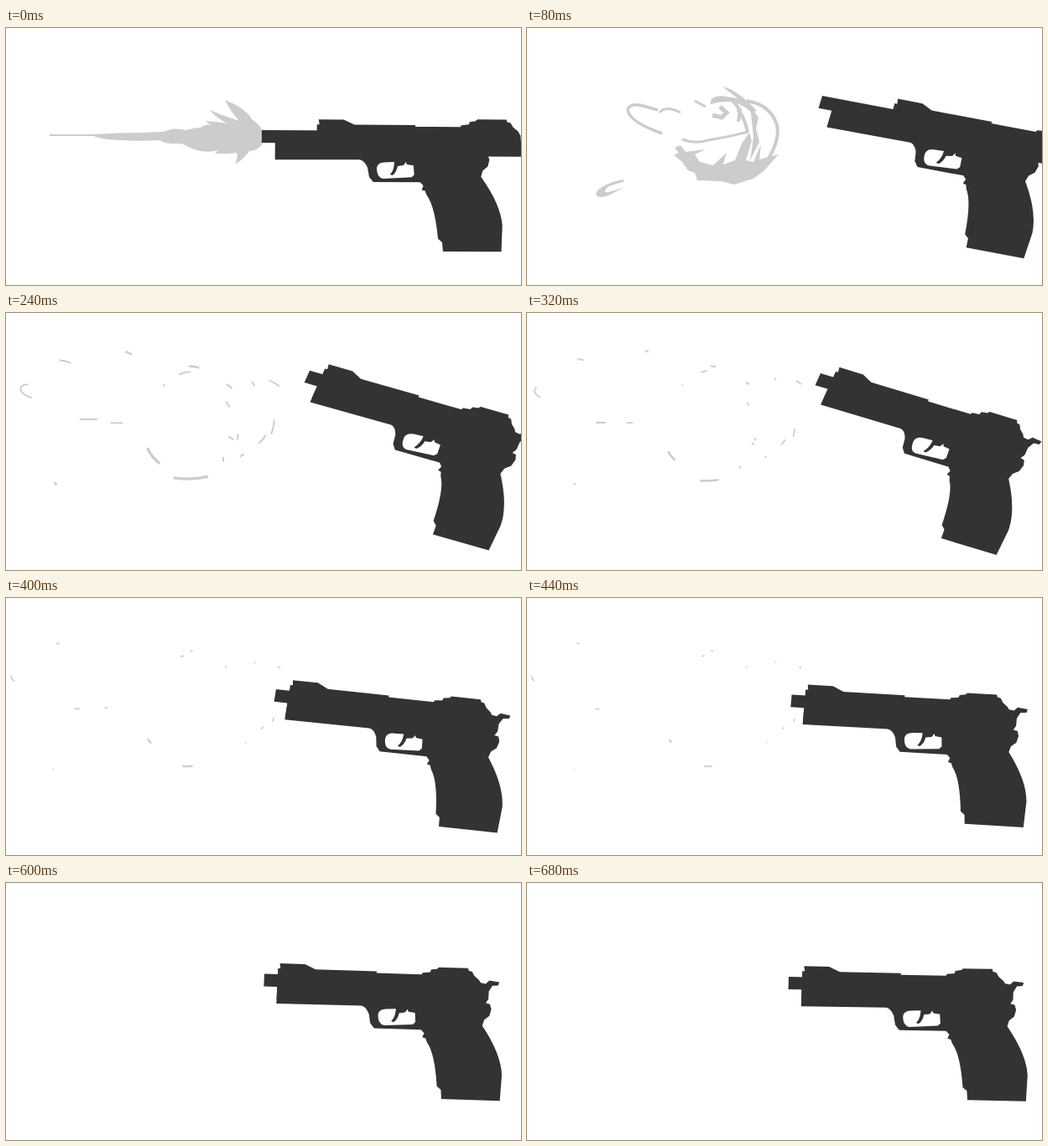
Recreate the animation shown at these times as an HTML page. Size 614 px wide and 307 px high, loop 720 ms.

```html
<!DOCTYPE html>
<html lang="en">
<head>
<meta charset="utf-8">
<title>Recoil</title>
<style>
html, body { margin: 0; width: 100%; height: 100%; overflow: hidden; background: #fff; }
svg { display: block; }
#smoke path { fill: none; stroke: #ccc; }
#smoke path.solid { fill: #ccc; stroke: none; }
#gun { fill: #333; }
</style>
</head>
<body>
<svg width="614" height="307" viewBox="0 0 614 307">
  <g id="smoke"></g>
  <g id="gun">
    <path fill-rule="evenodd" d="M309 118H560L568 121L574 122L578 118L590 119.500L589 123.500L582 124L578 131L578 140L575 145L580 146L582 152L580 160L574 165L572 172Q596 205 598 230L597 261H527L526 250L521 246Q517 207 507 194L505 189L501 188L503 183L499 179H443L438 173L436 162Q432 153 426 152.500L325 153V133H309Z
      M447 162Q448 156 456 155.500L468 155Q468 165 463 170L466 171Q471 167 472 160L479 159L482 155L483 158L491 159L492 170L489 173L455 175Q447 174 447 162Z"/>
    <path id="slide" d="M325 111H328L327 105H357L370 111H443V113H497L498 111L507 110L508 107L515 106L517 104H552L553 107L557 108L560 113L566 118L569 123L571 148H325Z"/>
  </g>
</svg>
<script>
const STEP = 40, COUNT = 18;
const MUZZLE = [309, 118];

// step, muzzle x/y, axis along the barrel, axis down the grip
const poses = [
  [0, 305, 122, .995, .005, -.007, 1.006],
  [2, 352, 81, .981, .186, -.295, .984],
  [4, 367, 73, .973, .224, -.363, .972],
  [8, 350, 72, .94, .285, -.427, .944],
  [10, 322, 109, .995, .107, -.16, .984],
  [13, 309, 118, 1, 0, 0, 1],
  [15, 308, 108.5, .997, .03, -.045, 1],
  [17, 312, 112, .997, .02, -.03, 1]
];
const slideBack = [50, 73, 70, 34];

const flame = 'M52 127H105Q130 125 165 125Q180 124 188 124Q200 118 215 122Q225 119 232 119Q238 114 244 116L238 111L250 112L264 114Q250 107 243 98Q262 106 278 111Q268 100 261 86Q286 96 293 109Q302 115 306 123V138Q300 147 290 147Q284 156 273 163Q277 153 275 149Q262 151 249 150L253 146Q237 151 217 142Q212 138 205 138Q190 139 183 134Q160 136 120 133Q108 131 105 129H52Z';
const crescent = 'M172 147Q174 154 181 158Q184 167 191 169Q195 178 200 182L208 186Q216 189 222 186Q232 178 238 180Q242 187 254 184L271 182Q264 187 255 189Q245 197 232 196Q215 194 200 190Q190 188 184 177Q170 166 172 147Z';

// path, stroke width (0 = filled)
const burst = [
  ['M161 126Q122 112 120 98Q122 88 142 94L156 98', 3.5],
  ['M158 101Q166 92 183 101', 3],
  ['M200 87L213 94', 3],
  ['M115 181Q86 187 82 198Q84 205 97 200L115 191L97 196Q90 198 95 191Q101 187 115 184Z', 0],
  ['M233 70Q252 74 274 99L268 101Q248 82 219 91Q217 82 232 81L251 84Z', 0],
  ['M262 87Q291 92 298 116Q302 134 286 159', 4],
  ['M266 93L276 107L273 120L277 136L266 158L270 130Z', 0],
  ['M251 97Q259 106 263 124', 4],
  ['M221 104L232 107L238 101L230 94', 5],
  ['M243 84L254 98L252 112', 4],
  ['M185 133Q200 139 216 134Q240 130 264 124', 3],
  ['M176 143L183 140L189 148L213 145L200 151L206 160L222 164L238 149L234 163L248 158L256 138L265 125L268 135L261 158L270 160L279 139L277 157L300 151L283 170L270 180L247 187L232 183L203 182L200 173L192 170L185 160L175 152L181 149Z', 0]
];

// path, width, drift x/y, last step
const wisps = [
  ['M68 99Q40 92 43 83Q46 77 64 81', 2.2, -38, 9, 12],
  ['M78 65Q84 60 103 69', 2.2, -30, -10, 11],
  ['M150 51L164 58', 3.2, -16, -10, 9],
  ['M110 115H148', 2.5, -46, 18, 13],
  ['M147 132H173', 1.8, -42, -1, 10],
  ['M210 83Q209 74 232 74', 2.2, -9, -6, 13],
  ['M220 65Q234 64 242 69', 3, -11, -2, 11],
  ['M197 93V87', 1.8, -13, -5, 8],
  ['M269 94Q279 99 280 104', 2.5, -14, -16, 11],
  ['M289 97L294 107', 2.5, 5, -26, 11],
  ['M263 105L271 117', 2.5, -4, -3, 8],
  ['M260 126L270 133', 2.5, 5, 30, 8],
  ['M275 141V151', 2.5, -24, 43, 8],
  ['M290 134L288 146', 2.5, -19, 12, 9],
  ['M268 167L276 161', 2.5, 14, 9, 11],
  ['M295 80Q310 84 317 93', 2, 19, -2, 13],
  ['M320 99Q322 115 314 131', 2.2, -1, 31, 13],
  ['M314 131Q308 145 297 149', 2.2, -2, 14, 13],
  ['M174 153Q178 176 200 186', 4.5, -12, -2, 11],
  ['M192 186Q225 198 266 184', 4.5, -13, 10, 11],
  ['M63 201L67 207', 3.5, -9, 0, 11]
];

const smoke = document.getElementById('smoke');
const gun = document.getElementById('gun');
const slide = document.getElementById('slide');

function addPath(d, solid) {
  const el = document.createElementNS('http://www.w3.org/2000/svg', 'path');
  el.setAttribute('d', d);
  el.setAttribute('pathLength', 1);
  if (solid) el.setAttribute('class', 'solid');
  smoke.append(el);
  return el;
}
const show = (el, on) => el.setAttribute('visibility', on ? 'visible' : 'hidden');

const flameEl = addPath(flame, true);
const crescentEl = addPath(crescent, true);
const burstEls = burst.map(([d, w]) => addPath(d, !w));
const wispEls = wisps.map(([d]) => addPath(d));

function slope(i, c) {
  const a = poses[Math.max(i - 1, 0)], b = poses[Math.min(i + 1, poses.length - 1)];
  return (b[c] - a[c]) / (b[0] - a[0]);
}

// smooth curve through the poses
function poseAt(s) {
  let i = 0;
  while (i < poses.length - 2 && s >= poses[i + 1][0]) i++;
  const a = poses[i], b = poses[i + 1], h = b[0] - a[0], t = (s - a[0]) / h;
  const t2 = t * t, t3 = t2 * t;
  return a.map((v, c) =>
    (2 * t3 - 3 * t2 + 1) * v + (t3 - 2 * t2 + t) * h * slope(i, c) +
    (3 * t2 - 2 * t3) * b[c] + (t3 - t2) * h * slope(i + 1, c));
}

function drawGun(s) {
  const [, x, y, ux, uy, vx, vy] = poseAt(s);
  gun.setAttribute('transform',
    `matrix(${ux} ${uy} ${vx} ${vy} ${x} ${y}) translate(${-MUZZLE[0]} ${-MUZZLE[1]})`);
  slide.setAttribute('transform', `translate(${slideBack[s] || 0} 0)`);
}

function drawSmoke(s) {
  show(flameEl, s === 0);
  show(crescentEl, s === 3 || s === 4);
  burstEls.forEach((el, i) => {
    show(el, s === 1 || s === 2);
    el.setAttribute('stroke-width', burst[i][1] * (s === 1 ? 2.2 : 1));
    el.setAttribute('transform', s === 1 ? 'translate(8 0)' : '');
  });

  const age = s - 4;
  const drift = 1 - Math.exp(-.55 * age);
  const part = Math.min(1, Math.exp(-.3 * age));
  const thin = Math.exp(-.25 * age);
  wispEls.forEach((el, i) => {
    const [, w, dx, dy, end] = wisps[i];
    show(el, s >= 3 && s <= end);
    el.setAttribute('transform', `translate(${dx * drift} ${dy * drift})`);
    el.setAttribute('stroke-width', 1.4 + (w - 1.4) * thin);
    el.setAttribute('stroke-dasharray', `0 ${(1 - part) / 2} ${part} 2`);
  });
}

const start = performance.now();
let last = -1;
function tick() {
  const s = Math.floor((performance.now() - start) / STEP) % COUNT;
  if (s !== last) {
    last = s;
    drawGun(s);
    drawSmoke(s);
  }
  requestAnimationFrame(tick);
}
tick();
</script>
</body>
</html>
```
